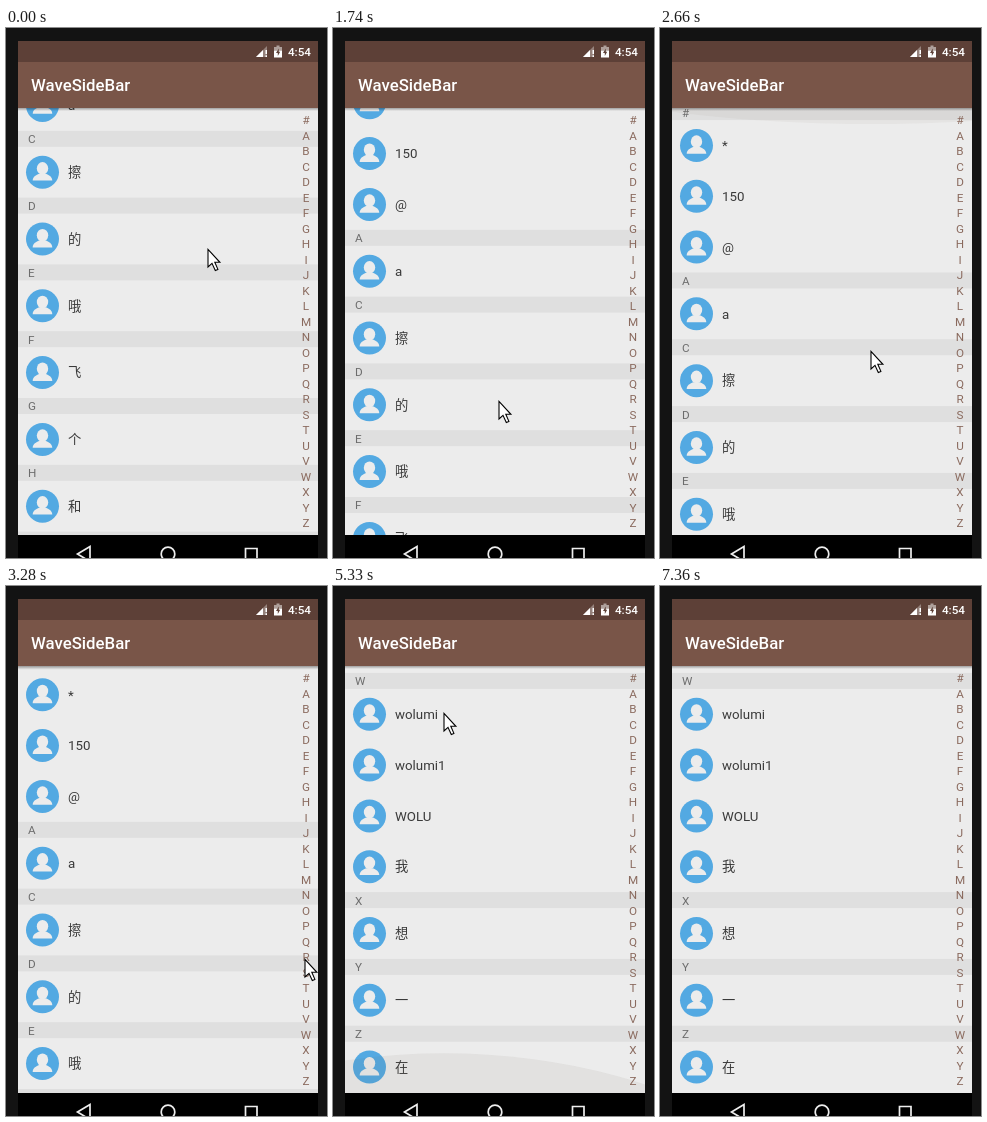
An HTML page with a canvas for the animation above (7830 ms loop, 321 by 530 pixels).

```html
<!DOCTYPE html>
<html lang="zh-CN">
<head>
<meta charset="utf-8">
<title>WaveSideBar</title>
<style>
html, body { margin: 0; height: 100%; overflow: hidden; background: #131313; }
canvas { display: block; }
</style>
</head>
<body>
<canvas id="stage" width="321" height="530"></canvas>
<script>
const ctx = document.getElementById('stage').getContext('2d');
const LOOP = 7830, STEP = 150;
const LEFT = 12, WIDTH = 300, TOP = 80, BOTTOM = 507;
const HEADER = 16, ROW = 50.8;
const FONT = 'Roboto, "Noto Sans CJK SC", "Noto Sans CJK", sans-serif';
const LETTERS = '#ABCDEFGHIJKLMNOPQRSTUVWXYZ';
const PRESS = 4190, PRESSED_LETTER = LETTERS.indexOf('W');

const sections = [
  ['#', '*', '150', '@'], ['A', 'a'], ['C', '擦'], ['D', '的'], ['E', '哦'], ['F', '飞'],
  ['G', '个'], ['H', '和'], ['V', 'v'], ['W', 'wolumi', 'wolumi1', 'WOLU', '我'],
  ['X', '想'], ['Y', '一'], ['Z', '在']
];
const contentHeight = sections.reduce((sum, s) => sum + HEADER + ROW * (s.length - 1), 0);
const END = contentHeight - (BOTTOM - TOP) + .9;

// Turning points of the pointer: time, x, y
const pointer = [[0, 202, 221], [550, 200, 334], [1130, 186, 191], [1740, 166, 373],
  [2050, 166, 232], [2350, 167, 298], [3280, 299, 373], [3890, 299, 447], [4650, 298, 448],
  [5330, 111, 127], [6210, 114, 208], [6510, 104, 190], [7360, 300, 545]];
// Time, scroll offset before the jump; time, pull away from the end after it
const drag = [[1130, 212.8], [1740, 47], [2350, 0], [3280, 13]];
const pull = [[5640, 0], [6210, 27], [6510, 0]];

// Linear motion between keys, advancing once per STEP
function valuesAt(keys, t) {
  const next = keys.findIndex(key => key[0] > t);
  if (next <= 0) return keys.at(next).slice(1);
  const [start, ...from] = keys[next - 1], [end, ...to] = keys[next];
  const steps = Math.round((end - start) / STEP);
  const u = Math.floor((t - start) / (end - start) * steps + 1e-6) / steps;
  return from.map((v, i) => v + (to[i] - v) * u);
}

function scrollAt(t) {
  return t < PRESS ? valuesAt(drag, t)[0] : END - valuesAt(pull, t)[0];
}

function rect(x, y, w, h, color) {
  ctx.fillStyle = color;
  ctx.fillRect(x, y, w, h);
}

function text(str, x, centerY, size, color, weight = 400, align = 'left') {
  ctx.font = `${weight} ${size}px ${FONT}`;
  ctx.textAlign = align;
  ctx.fillStyle = color;
  ctx.fillText(str, x, centerY + size * .355);
}

function disc(x, y, rx, ry, color) {
  ctx.fillStyle = color;
  ctx.beginPath();
  ctx.ellipse(x, y, rx, ry, 0, 0, Math.PI * 2);
  ctx.fill();
}

function shape(d, x, y, fill, stroke, lineWidth) {
  const path = new Path2D(d);
  ctx.save();
  ctx.translate(x, y);
  if (fill) { ctx.fillStyle = fill; ctx.fill(path); }
  if (stroke) { ctx.strokeStyle = stroke; ctx.lineWidth = lineWidth; ctx.stroke(path); }
  ctx.restore();
}

function drawAvatar(y) {
  disc(36.5, y, 16.5, 16.5, '#53a9e2');
  disc(36.5, y - 3.8, 5.7, 6.3, '#ececec');
  shape('M-9.8 8.4C-9.8 4-6 3-3.5 1.5H3.5C6 3 9.8 4 9.8 8.4Z', 36.5, y, '#ececec');
}

// Overscroll arc that appears at its peak, then shrinks and fades
function drawGlow(t, peak, edge, direction, scale, alpha) {
  const strength = 1 - Math.floor((t - peak) / STEP) / 3;
  if (t < peak || strength <= 0) return;
  const radius = 450, depth = 60.3, x = valuesAt(pointer, t)[0];
  const ry = radius * scale * strength;
  ctx.globalAlpha = alpha * strength;
  disc(x, edge + direction * (depth / radius - 1) * ry, radius, ry, '#6d594f');
  ctx.globalAlpha = 1;
}

function drawList(t) {
  ctx.save();
  ctx.beginPath();
  ctx.rect(LEFT, TOP, WIDTH, BOTTOM - TOP);
  ctx.clip();
  rect(LEFT, TOP, WIDTH, BOTTOM - TOP, '#ececec');
  let y = TOP + .4 - scrollAt(t);
  for (const [letter, ...names] of sections) {
    rect(LEFT, y, WIDTH, HEADER, '#dfdfdf');
    text(letter, 22, y + HEADER / 2 + .3, 11.7, '#6c6c6c');
    y += HEADER;
    for (const name of names) {
      drawAvatar(y + ROW / 2);
      text(name, 62, y + ROW / 2, 13.3, '#3a3a3a');
      y += ROW;
    }
  }
  drawGlow(t, 2350, TOP, 1, .8, .16);
  drawGlow(t, 5330, BOTTOM, -1, .66, .08);
  const shadow = ctx.createLinearGradient(0, TOP, 0, TOP + 3);
  shadow.addColorStop(0, 'rgba(0,0,0,.32)');
  shadow.addColorStop(1, 'rgba(0,0,0,0)');
  rect(LEFT, TOP, WIDTH, 3, shadow);
  ctx.restore();
}

// While a letter is pressed, its neighbours swell out to the left
function drawSideBar(t) {
  const pressed = t >= PRESS && t < PRESS + STEP;
  [...LETTERS].forEach((letter, i) => {
    const wave = pressed ? Math.max(0, 1 - (i - PRESSED_LETTER) ** 2 / 16) : 0;
    ctx.globalAlpha = wave === 1 ? 1 : 1 - wave;
    text(letter, 300 - 67 * wave, 92 + i * 15.5, 11.7 * (1 + wave), '#8a6a5e', 400, 'center');
  });
  ctx.globalAlpha = 1;
}

function drawBars() {
  rect(LEFT, 13, WIDTH, 21, '#5d4037');
  rect(LEFT, 34, WIDTH, 46, '#795548');
  text('WaveSideBar', 25, 57.5, 16.8, '#fff', 500);
  text('4:54', 305, 23.7, 11.7, '#fff', 500, 'right');
  shape('M0 11L11 0V11Z', 250, 18, 'rgba(255,255,255,.35)');
  shape('M0 11L7 4V11Z', 250, 18, '#fff');
  rect(259.5, 22, 1.5, 4, '#fff');
  rect(259.5, 27.3, 1.5, 1.7, '#fff');
  shape('M0 1.5H2.5V0H5.5V1.5H8V5H0Z', 268, 17.5, 'rgba(255,255,255,.5)');
  rect(268, 22.5, 8, 7, '#fff');
  shape('M4.8 3L2 7.4H3.8V10.6L6.2 6.2H4.8Z', 268, 17.5, '#5d4037');

  rect(LEFT, BOTTOM, WIDTH, 23, '#000');
  shape('M.5 7.5L13 0V15Z', 71, 518.5, null, '#eee', 1.7);
  shape('M-6.8 0A6.8 6.8 0 1 1 6.8 0A6.8 6.8 0 1 1-6.8 0Z', 162, 526, null, '#eee', 1.7);
  shape('M0 0H11.5V11.5H0Z', 239.5, 520.5, null, '#eee', 1.7);
}

function drawPointer(t) {
  const [x, y] = valuesAt(pointer, t);
  shape('M0 .5V18L4 14.3L7.3 21.5L9.9 20.4L6.8 13.3H11.9Z', x, y, '#fff', '#000', 1.1);
}

function draw(t) {
  rect(0, 0, 321, 530, '#131313');
  drawList(t);
  drawSideBar(t);
  drawBars();
  drawPointer(t);
}

const begin = performance.now();
function loop() {
  draw((performance.now() - begin) % LOOP);
  requestAnimationFrame(loop);
}
loop();
</script>
</body>
</html>
```
